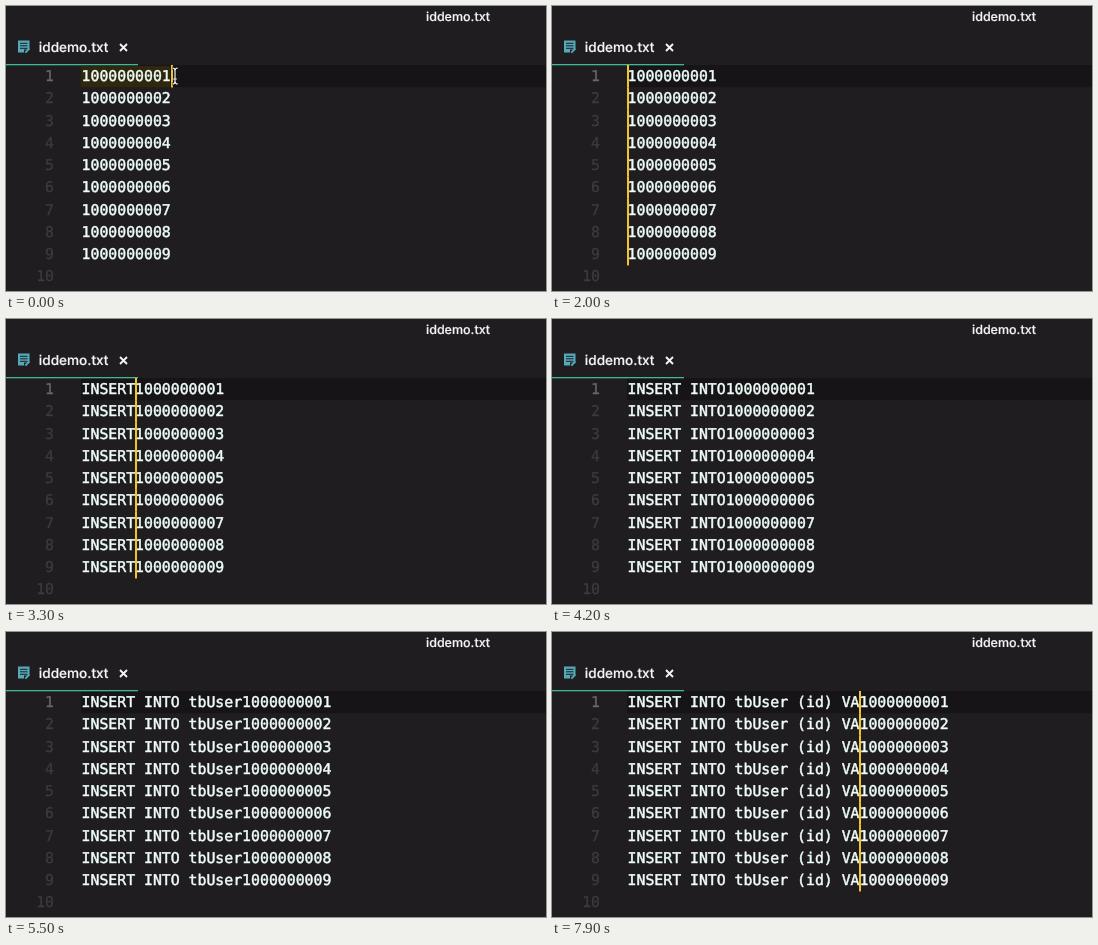
These frames come from a looping animation (540 px wide and 285 px high, 8 s). An HTML page with a canvas:

```html
<!DOCTYPE html>
<html lang="en">
<head>
<meta charset="utf-8">
<title>Column editing</title>
<style>
html, body { margin: 0; width: 100%; height: 100%; overflow: hidden; background: #1f1d20; }
canvas { display: block; }
</style>
</head>
<body>
<canvas id="stage" width="540" height="285"></canvas>
<script>
const ctx = document.getElementById('stage').getContext('2d');
const LOOP = 8000, STEP = 100;
const LEFT = 75.6, CHAR = 8.923, TOP = 59, ROW = 22.25, ROWS = 9;
const MONO = '14.82px "DejaVu Sans Mono", monospace';
const HOME_AT = 1800;

// Each burst of typing: text, time of the first key, time between keys
const bursts = [
  ['INSERT', 2400, 140],
  [' INTO', 3350, 80],
  [' tbUser', 4280, 105],
  [' (id', 5700, 260],
  [') VA', 7200, 200]
];

// Pointer height while dragging: time, y
const drag = [[0, 70], [100, 70], [900, 248], [1200, 270], [1500, 249], [1800, 249]];

ctx.textRendering = 'geometricPrecision';
ctx.lineJoin = 'round';

function rect(x, y, w, h, color) {
  ctx.fillStyle = color;
  ctx.fillRect(x, y, w, h);
}

// A thin outline thickens the strokes without changing the spacing
function label(text, x, y, font, color, weight = 0, align = 'left') {
  ctx.font = font;
  ctx.fillStyle = ctx.strokeStyle = color;
  ctx.textAlign = align;
  ctx.fillText(text, x, y);
  if (weight) {
    ctx.lineWidth = weight;
    ctx.strokeText(text, x, y);
  }
}

function typedAt(t) {
  let text = '', last = HOME_AT;
  for (const [word, start, gap] of bursts) {
    for (let i = 0; i < word.length; i++) {
      const at = start + i * gap;
      if (at <= t) {
        text += word[i];
        last = at;
      }
    }
  }
  return { text, last };
}

function pointerY(t) {
  for (let i = 1; i < drag.length; i++) {
    const [t0, y0] = drag[i - 1], [t1, y1] = drag[i];
    if (t <= t1) return y0 + (y1 - y0) * (t - t0) / (t1 - t0);
  }
  return drag[drag.length - 1][1];
}

function drawFileIcon() {
  const teal = '#55a9b8', back = '#1f1d20';
  rect(12, 34.5, 11.5, 9, teal);
  rect(12, 43, 6, 3.5, teal);
  for (let i = 0; i < 3; i++) rect(14, 36.8 + i * 2.5, 7.5, 1, back);
  ctx.strokeStyle = teal;
  ctx.lineWidth = 2;
  ctx.beginPath();
  ctx.moveTo(19.3, 46.6);
  ctx.lineTo(23.3, 42.6);
  ctx.stroke();
}

function drawClose() {
  ctx.strokeStyle = '#f4f4f4';
  ctx.lineWidth = 1.9;
  ctx.beginPath();
  ctx.moveTo(114, 38);
  ctx.lineTo(121, 45);
  ctx.moveTo(121, 38);
  ctx.lineTo(114, 45);
  ctx.stroke();
}

function drawPointer(x, y) {
  ctx.beginPath();
  ctx.moveTo(x - 2.8, y - 8);
  ctx.quadraticCurveTo(x, y - 8, x, y - 5.5);
  ctx.lineTo(x, y + 5.5);
  ctx.quadraticCurveTo(x, y + 8, x - 2.8, y + 8);
  ctx.moveTo(x + 2.8, y - 8);
  ctx.quadraticCurveTo(x, y - 8, x, y - 5.5);
  ctx.moveTo(x, y + 5.5);
  ctx.quadraticCurveTo(x, y + 8, x + 2.8, y + 8);
  ctx.moveTo(x - 1.8, y + 3);
  ctx.lineTo(x + 1.8, y + 3);
  for (const [color, width] of [['#111', 2.8], ['#f4f4f4', 1.2]]) {
    ctx.strokeStyle = color;
    ctx.lineWidth = width;
    ctx.stroke();
  }
}

function drawCaret(col, row) {
  rect(Math.round(LEFT + col * CHAR - 0.3), TOP + row * ROW, 2, ROW + 0.2, '#f3c32c');
}

function draw(t) {
  const { text, last } = typedAt(t);
  const dragging = t < HOME_AT;
  const y = pointerY(t);
  const carets = dragging ? Math.floor((y - TOP) / ROW) + 1 : ROWS;

  rect(0, 0, 540, 285, '#1f1d20');
  label('iddemo.txt', 420, 14.6, '500 12.5px Inter, sans-serif', '#f4f4f4', 0.2);
  drawFileIcon();
  label('iddemo.txt', 32.8, 46.2, '500 13.6px Inter, sans-serif', '#f6f6f6', 0.2);
  drawClose();

  rect(75, TOP, 465, ROW, '#161416');
  rect(0, 58, 132, 1.3, '#3fb893');
  if (carets === 1) rect(75, TOP + 1, CHAR * 10, ROW - 1, '#30270f');

  for (let i = 0; i <= ROWS; i++) {
    const base = 75.2 + i * (ROW - 0.02);
    label(i + 1, 48, base, MONO, i ? '#3d3b3e' : '#69676a', 0.3, 'right');
    if (i < ROWS) label(text + (1000000001 + i), LEFT, base, MONO, '#effdf8', 0.5);
  }

  const visible = dragging || Math.floor((t - last) / 500) % 2 === 0;
  if (visible) {
    for (let i = 0; i < carets; i++) {
      drawCaret(dragging ? (i < ROWS ? 10 : 0) : text.length, i);
    }
  }
  if (dragging) drawPointer(169, y);
}

const began = performance.now();
function frame() {
  const t = (performance.now() - began) % LOOP;
  draw(Math.floor(t / STEP) * STEP);
  requestAnimationFrame(frame);
}
frame();
</script>
</body>
</html>
```
